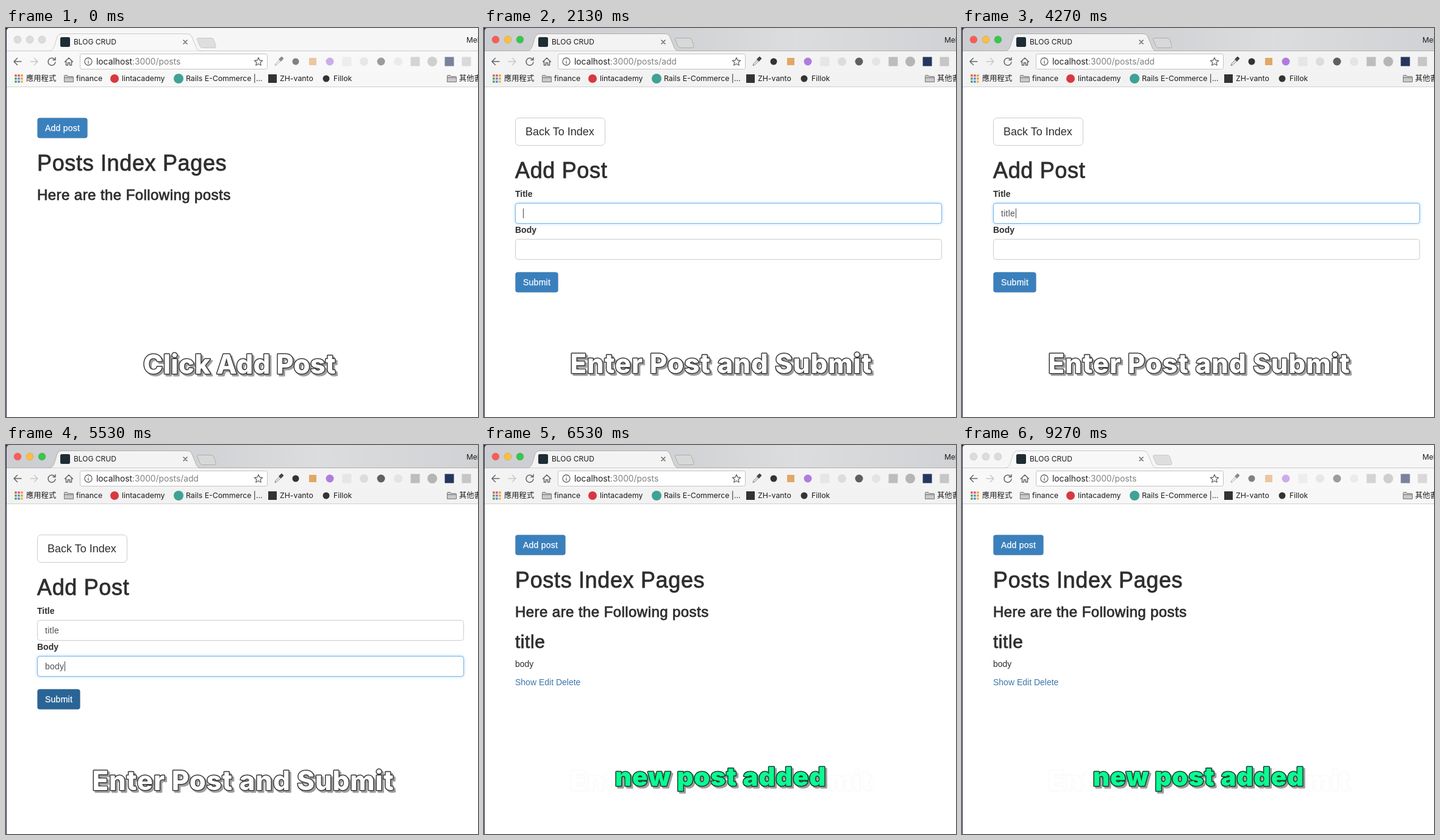
Write an HTML page that moves like this. It is 774x638 px and loops after 9.34 s.

```html
<!DOCTYPE html>
<html lang="en">
<head>
<meta charset="utf-8">
<title>Blog CRUD</title>
<style>
  html, body { margin: 0; width: 774px; height: 638px; overflow: hidden; background: #1f2a44; }
  svg {
    display: block;
    font-family: Inter, "Noto Sans CJK TC", "Noto Sans CJK", sans-serif;
    animation: window 9340ms step-end infinite, scene 9340ms step-end infinite;
  }

  /* Window focus: traffic lights and toolbar shades */
  @keyframes window {
    0%, 97.75% {
      --bar: #f6f6f6; --tool: #f8f8f8; --marks: #f7f7f7; --plus: #dedede; --edge: #c9c9c9;
      --red: #dcdcdc; --yellow: #dcdcdc; --green: #dcdcdc; --sheen: 0; --icon: .6;
    }
    5.03% {
      --bar: #cdced1; --tool: #f3f3f3; --marks: #f2f2f2; --plus: #d8d8d8; --edge: #adadad;
      --red: #fc5b57; --yellow: #fdbe41; --green: #35c84a; --sheen: 1; --icon: 1;
    }
  }
  /* Page flow: empty list, form, second field, hovered submit, list with post */
  @keyframes scene {
    0% { --index: 1; --form: 0; --post: 0; --first: 1; --second: 0; --submit: #3a80bd; --add: transparent; }
    21.41% { --index: 0; --form: 1; --post: 0; --first: 1; --second: 0; --submit: #3a80bd; --add: #808080; }
    47.11% { --index: 0; --form: 1; --post: 0; --first: 0; --second: 1; --submit: #3a80bd; --add: #808080; }
    56.5% { --index: 0; --form: 1; --post: 0; --first: 0; --second: 1; --submit: #2a6496; --add: #808080; }
    62.1% { --index: 1; --form: 0; --post: 1; --first: 0; --second: 0; --submit: #3a80bd; --add: transparent; }
  }
  @keyframes click { 0% { opacity: 1 } 12.85% { opacity: 0 } }
  @keyframes enter {
    0% { opacity: 0 }
    12.85% { opacity: 1 }
    62.1% { opacity: 1; animation-timing-function: linear }
    63.2%, 100% { opacity: .02 }
  }
  @keyframes added { 0% { opacity: 0 } 62.8% { opacity: 1 } }

  .bar { fill: var(--bar) } .tool { fill: var(--tool) } .marks { fill: var(--marks) }
  .sheen { opacity: var(--sheen) } .exts { opacity: var(--icon) }
  .index { opacity: var(--index) } .form { opacity: var(--form) } .post { opacity: var(--post) }
  .first { opacity: var(--first) } .second { opacity: var(--second) }
  .ui { font-size: 12.3px; fill: #1c1c1c }
  .line { fill: none; stroke: #666; stroke-width: 1.5; stroke-linecap: round; stroke-linejoin: round }
  .page { font: 14px "Liberation Sans", Arial, sans-serif; fill: #2e2e2e }
  .head { stroke: #2e2e2e; stroke-width: .8px; letter-spacing: .018em }
  .h1 { font-size: 36px } .h2 { font-size: 30px } .h3 { font-size: 24px }
  .label { font-weight: 700 }
  .btn { stroke: #000; stroke-opacity: .1 }
  .btn + text { fill: #fff; stroke: #fff; stroke-width: .25px; letter-spacing: .25px }
  .field { fill: #fff; stroke: #ccc }
  .glow { fill: #fff; stroke: #74b5ea; filter: drop-shadow(0 0 2.5px rgba(102, 175, 233, .5)) }
  .typed { fill: #505050; letter-spacing: .25px }
  .caption {
    font-size: 43.5px; font-weight: 800; text-anchor: middle; letter-spacing: .3px;
    fill: #fff; stroke: #3a3a3a; stroke-width: 3px; stroke-linejoin: round; paint-order: stroke;
    filter: drop-shadow(3px 3px .6px rgba(0, 0, 0, .38));
    animation: 9340ms step-end infinite;
  }
  .click { animation-name: click }
  .enter { animation-name: enter; letter-spacing: 1px }
  .added { animation-name: added; font-size: 42px; font-weight: 900; letter-spacing: 1px; fill: #0cfa92; stroke: #153c2b }
</style>
</head>
<body>
<svg width="774" height="638" viewBox="0 0 774 638">
  <defs>
    <linearGradient id="sheen">
      <stop offset="0" stop-color="#fff" stop-opacity="0"/>
      <stop offset=".45" stop-color="#fff" stop-opacity=".12"/>
      <stop offset=".66" stop-color="#fff" stop-opacity=".3"/>
      <stop offset="1" stop-color="#fff" stop-opacity=".08"/>
    </linearGradient>
    <g id="folder" fill="#c9c9c9" stroke="#777">
      <path d="M.5 11.5V1.5Q.5.5 1.5.5H5.5L7 2.5H14.5Q15.5 2.5 15.5 3.5V11.5Z"/>
      <path d="M.5 4.5H15.5"/>
    </g>
  </defs>

  <!-- Window -->
  <path class="bar" d="M1 638V5Q1 0 6 0H774V638Z"/>
  <rect class="sheen" x="1" width="773" height="38" fill="url(#sheen)"/>
  <g stroke="#000" stroke-opacity=".1">
    <circle cx="19" cy="19" r="6" fill="var(--red)"/>
    <circle cx="39" cy="19" r="6" fill="var(--yellow)"/>
    <circle cx="59" cy="19" r="6" fill="var(--green)"/>
  </g>
  <path d="M1 37.5H774" stroke="var(--edge)"/>
  <path class="tool" stroke="var(--edge)" d="M71 37.5C77 37 79 33 83 17Q85 9.500 91 9.500H297Q303 9.500 305 15L312 32Q314 37.500 319 37.500"/>
  <path d="M316 16.500H337Q340 16.500 341 20L344 29Q345 32.500 342 32.500H322Q319 32.500 317.500 29L313.500 19Q312.500 16.500 316 16.500Z" fill="var(--plus)" stroke="var(--edge)"/>
  <rect x="89" y="15" width="16" height="16" rx="2.500" fill="#1e2c34"/>
  <text class="ui" x="111" y="27" style="font-size:12px">BLOG CRUD</text>
  <path class="line" d="M291 20l6 6m0-6l-6 6"/>
  <text class="ui" x="755" y="24" style="font-size:12px">Mel</text>

  <!-- Toolbar -->
  <rect class="tool" x="1" y="38" width="773" height="34"/>
  <g class="line">
    <path d="M25 55H13M18.500 49.500L13 55L18.500 60.500"/>
    <path d="M40 55H52M46.500 49.500L52 55L46.500 60.500" stroke="#c8c8c8"/>
    <path d="M79.700 51.500A6 6 0 1 0 81 56M81 48.500V52.500H77"/>
    <path d="M96.500 55.500L103 49L109.500 55.500M98.500 54.500V61H101.500V57H104.500V61H107.500V54.500"/>
  </g>
  <rect x="121.500" y="42.500" width="307" height="25" rx="3" fill="#fff" stroke="#c2c2c2"/>
  <g class="line" style="stroke-width:1.3px">
    <circle cx="135" cy="55" r="6"/>
    <path d="M135 54.500V58M135 52V52.100"/>
    <path d="M414 48.500L416 53L420.700 53.400L417.100 56.500L418.200 61.200L414 58.700L409.800 61.200L410.900 56.500L407.300 53.400L412 53Z"/>
  </g>
  <text x="148" y="60" font-size="13.800" fill="#222">localhost<tspan fill="#808080">:3000/posts</tspan><tspan fill="var(--add)">/add</tspan></text>
  <g class="exts" id="exts">
    <path d="M441 61.500L442 58.500L448 52.500L450 54.500L444 60.500Z" fill="#eee" stroke="#777"/>
    <path d="M447.500 51L452 47L455 50L451 54.500Z" fill="#444" stroke="#444" stroke-linejoin="round"/>
  </g>

  <!-- Bookmarks -->
  <rect class="marks" x="1" y="72" width="773" height="25"/>
  <path d="M1 96.500H774" stroke="#cfcfcf"/>
  <g id="apps"></g>
  <g class="ui">
    <text x="33" y="87">應用程式</text>
    <use href="#folder" x="95" y="77"/>
    <text x="115" y="87">finance</text>
    <circle cx="178" cy="83" r="7" fill="#d8383f"/>
    <text x="190" y="87">lintacademy</text>
    <circle cx="283" cy="83" r="8" fill="#3fa294"/>
    <text x="295" y="87">Rails E-Commerce |...</text>
    <rect x="430" y="76" width="14" height="14" fill="#333"/>
    <text x="449" y="87">ZH-vanto</text>
    <circle cx="525" cy="83" r="5.500" fill="#333"/>
    <text x="537" y="87">Fillok</text>
    <use href="#folder" x="723" y="77"/>
    <text x="743" y="87">其他書籤</text>
  </g>

  <!-- Page -->
  <rect x="1" y="97" width="773" height="541" fill="#fff"/>
  <g class="page index">
    <rect class="btn" x="51.500" y="147.500" width="82" height="33" rx="4" fill="#3a80bd"/>
    <text x="64" y="169">Add post</text>
    <text class="head h1" x="51" y="234">Posts Index Pages</text>
    <text class="head h3" x="51" y="282">Here are the Following posts</text>
    <g class="post">
      <text class="head h2" x="51" y="333">title</text>
      <text x="51" y="364">body</text>
      <text x="51" y="394" fill="#3a76ad">Show Edit Delete</text>
    </g>
  </g>
  <g class="page form">
    <rect class="field" x="51.500" y="147.500" width="147" height="45" rx="6"/>
    <text x="68" y="176" font-size="18">Back To Index</text>
    <text class="head h1" x="51" y="246">Add Post</text>
    <text class="label" x="51" y="277">Title</text>
    <rect class="field" x="51.500" y="287.500" width="699" height="33" rx="4"/>
    <rect class="glow first" x="51.500" y="287.500" width="699" height="33" rx="4"/>
    <text class="label" x="51" y="336">Body</text>
    <rect class="field" x="51.500" y="346.500" width="699" height="33" rx="4"/>
    <rect class="glow second" x="51.500" y="346.500" width="699" height="33" rx="4"/>
    <text class="typed" id="title" x="64" y="309"></text>
    <text class="typed" id="body" x="64" y="368"></text>
    <rect id="caret" width="1" height="16" fill="#444"/>
    <rect class="btn" x="51.500" y="400.500" width="70" height="33" rx="4" fill="var(--submit)"/>
    <text x="64" y="422">Submit</text>
  </g>

  <!-- Captions -->
  <text class="caption click" x="383" y="567">Click Add Post</text>
  <text class="caption enter" x="389" y="566">Enter Post and Submit</text>
  <text class="caption added" x="388" y="559">new post added</text>
</svg>
<script>
  const LOOP = 9340, KEY = 160;
  const $ = id => document.getElementById(id);

  function shape(parent, tag, attrs) {
    const el = document.createElementNS('http://www.w3.org/2000/svg', tag);
    for (const k in attrs) el.setAttribute(k, attrs[k]);
    parent.append(el);
  }
  const square = (g, x, y, s, fill) => shape(g, 'rect', { x: x - s / 2, y: y - s / 2, width: s, height: s, fill });
  const dot = (g, x, y, s, fill) => shape(g, 'circle', { cx: x, cy: y, r: s / 2, fill });

  // Extension buttons, 28px apart
  [
    [dot, 11, '#333'], [square, 12, '#e3a765'], [dot, 13, '#b07be0'], [square, 15, '#e6e6e6'],
    [dot, 14, '#dcdcdc'], [dot, 13, '#606060'], [dot, 14, '#e4e4e4'], [square, 15, '#bdbdbd'],
    [dot, 16, '#b5b5b5'], [square, 15, '#26365f'], [square, 15, '#c6c6c6']
  ].forEach(([draw, size, fill], i) => draw($('exts'), 475 + i * 28, 55, size, fill));

  ['#e0524a', '#e0524a', '#e89a3c', '#4c9d5b', '#4a86d8', '#e89a3c', '#4c9d5b', '#4a86d8', '#e8b53c']
    .forEach((fill, i) => square($('apps'), 16 + i % 3 * 5, 78 + Math.floor(i / 3) * 5, 3.4, fill));

  const fields = [
    { el: $('title'), text: 'title', focus: 2000, start: 3300, caretY: 296 },
    { el: $('body'), text: 'body', focus: 4400, start: 4700, caretY: 355 }
  ];

  function draw() {
    const t = performance.now() % LOOP;
    for (const f of fields) {
      const n = Math.floor((t - f.start) / KEY) + 1;
      f.count = Math.max(0, Math.min(f.text.length, n));
      const typed = f.text.slice(0, f.count);
      if (f.el.textContent !== typed) f.el.textContent = typed;
    }
    const f = fields[t < fields[1].focus ? 0 : 1];
    const last = f.count ? f.start + (f.count - 1) * KEY : f.focus;
    const caret = $('caret');
    caret.setAttribute('x', 64 + (f.count ? Math.ceil(f.el.getComputedTextLength()) : 0));
    caret.setAttribute('y', f.caretY);
    caret.setAttribute('opacity', t >= last && (t - last) % 1000 < 500 ? 1 : 0);
    requestAnimationFrame(draw);
  }
  draw();
</script>
</body>
</html>
```
